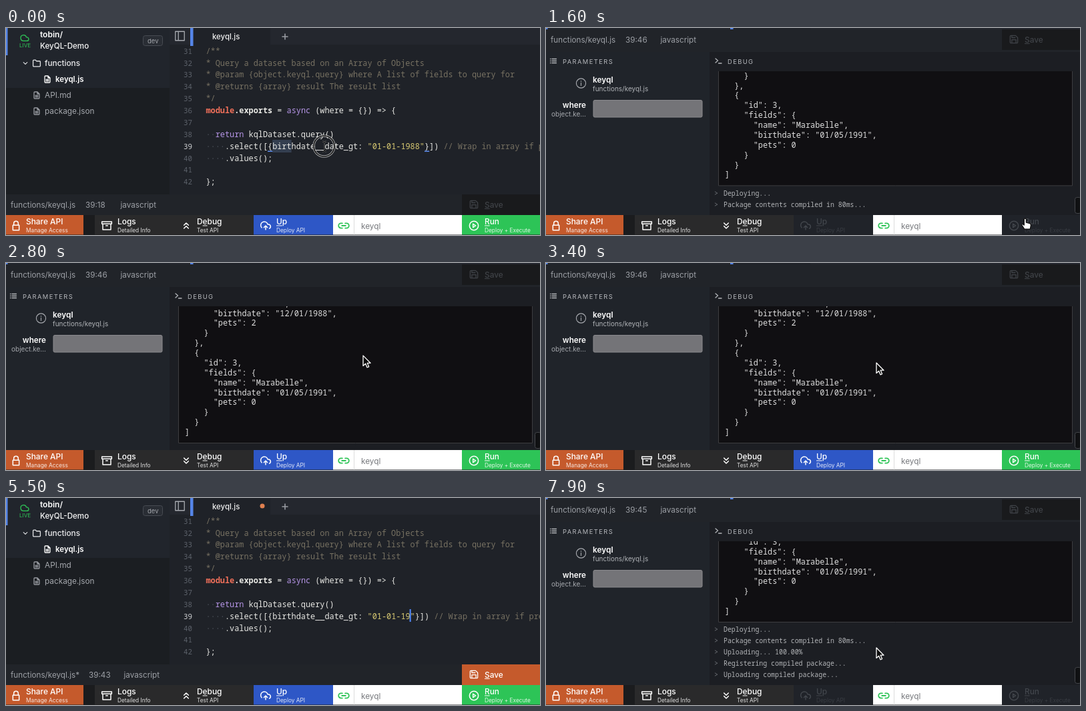
Write an HTML page with a canvas that moves like this. It is 800 px wide and 311 px high and loops after 8 s.

```html
<!DOCTYPE html>
<html lang="en">
<head>
<meta charset="utf-8">
<title>API editor</title>
<style>
  html, body { margin: 0; width: 100%; height: 100%; overflow: hidden; background: #1f2228; }
  canvas { display: block; width: 800px; height: 311px; }
</style>
</head>
<body>
<canvas id="stage"></canvas>
<script>
const canvas = document.getElementById('stage');
const ctx = canvas.getContext('2d');
const dpr = window.devicePixelRatio || 1;
canvas.width = 800 * dpr;
canvas.height = 311 * dpr;

const LOOP = 8000;
const RUNS = [1400, 7000];        // moments at which a deploy starts
const EDIT = 5400;                // first keystroke
const CLICKS = [1200, 4200, 5000, 6700];
const UI = 'Inter, "Open Sans", sans-serif';
const MONO = '"Noto Sans Mono", "DejaVu Sans Mono", monospace';
const COL = 7.12, CODE_X = 299.5, CODE_SIZE = COL / 0.6;
const ORANGE = '#c55a2c', PLAIN = '#e8e8e4', NOTE = '#777162', PURPLE = '#b796e8', RED = '#f0705a';

// Icons on a 24-unit grid
const CIRCLE = 'M2 12a10 10 0 1 0 20 0a10 10 0 1 0-20 0';
const ICON = {
  lock: 'M5 11h14v11H5zM7 11V7a5 5 0 0 1 10 0v4',
  archive: 'M21 8v13H3V8M1 3h22v5H1zM10 12h4',
  up: 'M17 11l-5-5-5 5M17 18l-5-5-5 5',
  down: 'M7 13l5 5 5-5M7 6l5 5 5-5',
  upload: 'M16 16l-4-4-4 4M12 12v9M20.4 18.4A5 5 0 0 0 18 9h-1.3A8 8 0 1 0 3 16.3',
  cloud: 'M18 10h-1.3A8 8 0 1 0 9 20h9a5 5 0 0 0 0-10z',
  link: 'M15 7h3a5 5 0 0 1 0 10h-3M9 17H6A5 5 0 0 1 6 7h3M8 12h8',
  play: CIRCLE + 'M10 8l6 4-6 4z',
  info: CIRCLE + 'M12 17v-6M12 7v1',
  save: 'M19 21H5a2 2 0 0 1-2-2V5a2 2 0 0 1 2-2h11l5 5v11a2 2 0 0 1-2 2zM17 21v-8H7v8M7 3v5h8',
  folder: 'M22 19a2 2 0 0 1-2 2H4a2 2 0 0 1-2-2V5a2 2 0 0 1 2-2h5l2 3h9a2 2 0 0 1 2 2z',
  file: 'M14 2H6a2 2 0 0 0-2 2v16a2 2 0 0 0 2 2h12a2 2 0 0 0 2-2V8zM14 2v6h6M16 13H8M16 17H8',
  list: 'M8 6h13M8 12h13M8 18h13M3 6h1M3 12h1M3 18h1',
  prompt: 'M3 17l7-6-7-6M12 19h9',
  chevron: 'M6 9l6 6 6-6',
  sidebar: 'M3 3h18v18H3zM9 3v18',
  plus: 'M12 4v16M4 12h16'
};
const ARROW = new Path2D('M0 0V15.5L3.6 12.2L6 17.8L8.6 16.7L6.2 11.2H11Z');
const HAND = new Path2D('M-1.5 1Q0-1 1.5 1V6L7 7.5Q9 8 8.5 11L7.5 16H-1L-5 10Q-5 8-3.5 8.5L-1.5 10Z');
const BEAM = new Path2D('M-3-7.5Q0-7.5 0-5.5Q0-7.5 3-7.5M0-5.5V5.5M-3 7.5Q0 7.5 0 5.5Q0 7.5 3 7.5');

const RESULT = [
  '      "name": "Tobin",', '      "birthdate": "12/01/1988",', '      "pets": 2', '    }', '  },', '  {',
  '    "id": 3,', '    "fields": {', '      "name": "Marabelle",', '      "birthdate": "01/05/1991",',
  '      "pets": 0', '    }', '  }', ']'
];
const LOG = [
  [100, 'Deploying...'], [200, 'Package contents compiled in 80ms...'], [250, 'Uploading... 100.00%'],
  [300, 'Registering compiled package...'], [400, 'Uploading compiled package...']
];

// time, x, y
const POINTER = [
  [0, 477, 178], [300, 630, 178], [500, 630, 178], [900, 730, 299], [1200, 736, 305], [1500, 736, 304],
  [2000, 561, 132], [2500, 561, 132], [3200, 495, 150], [3500, 495, 150], [4000, 300, 296],
  [4400, 300, 296], [4900, 618, 178], [6200, 618, 178], [6700, 736.5, 297], [7000, 736.5, 297],
  [7400, 560, 88], [7500, 560, 88], [7900, 495, 225]
];

const clamp = v => Math.max(0, Math.min(1, v));
const ease = v => { v = clamp(v); return v * v * (3 - 2 * v); };

function rect(x, y, w, h, color) {
  ctx.fillStyle = color;
  ctx.fillRect(x, y, w, h);
}

function text(s, x, y, size, color, { weight = 400, font = UI, spacing = 0, align = 'left' } = {}) {
  ctx.font = `${weight} ${size}px ${font}`;
  ctx.letterSpacing = spacing + 'px';
  ctx.textAlign = align;
  ctx.fillStyle = color;
  ctx.fillText(s, x, y);
}

const mono = (s, x, y, color, size = CODE_SIZE, weight = 400) =>
  text(s, x, y, size, color, { font: MONO, weight });

function icon(name, x, y, size, color, weight = 1.3) {
  const scale = size / 24;
  ctx.save();
  ctx.translate(x - size / 2, y - size / 2);
  ctx.scale(scale, scale);
  ctx.lineWidth = weight / scale;
  ctx.lineCap = ctx.lineJoin = 'round';
  ctx.strokeStyle = color;
  ctx.stroke(new Path2D(ICON[name]));
  ctx.restore();
}

// An underscore marks the shortcut letter that follows it.
function label(s, x, y, color) {
  const at = s.indexOf('_');
  text(s.replace('_', ''), x, y, 11.9, color, { weight: 500 });
  if (at < 0) return;
  const start = x + ctx.measureText(s.slice(0, at)).width;
  rect(start, y + 1.5, ctx.measureText(s[at + 1]).width, 1, color);
}

function clipped(x, y, w, h, paint) {
  ctx.save();
  ctx.beginPath();
  ctx.rect(x, y, w, h);
  ctx.clip();
  paint();
  ctx.restore();
}

function roundBox(x, y, w, h, r, fill, stroke) {
  ctx.beginPath();
  ctx.roundRect(x, y, w, h, r);
  ctx.fillStyle = fill;
  ctx.fill();
  ctx.strokeStyle = stroke;
  ctx.lineWidth = 1;
  ctx.stroke();
}

function stateAt(t) {
  const year = t < EDIT ? '1988' : t < 5500 ? '198' : t < 5700 ? '19' : t < 5900 ? '199' : '1990';
  const column = t < 5000 ? Math.round(18 + 28 * clamp(t / 300)) : 41 + year.length;
  const run = t >= RUNS[1] ? RUNS[1] : t >= RUNS[0] ? RUNS[0] : Infinity;
  const busy = t >= run && t < run + (run === RUNS[0] ? 600 : LOOP);
  const opened = ease((t - RUNS[0] + 50) / 200) - ease((t - 4200) / 300) + ease((t - RUNS[1] + 50) / 200);
  return {
    t, year, column, busy, opened, run,
    dirty: t >= EDIT && t < RUNS[1],
    panelY: 248 * (1 - opened)
  };
}

function sidebar(s) {
  rect(0, 0, 245, 281, '#1b1e22');
  rect(0, 0, 245, 90, '#21252c');
  rect(0, 0, 2.5, 41, '#5585e8');
  icon('cloud', 28, 15, 13, '#2fc457');
  text('LIVE', 20, 29, 8.1, '#2fc457');
  text('tobin/', 51, 13.5, 12, '#fff', { weight: 600 });
  text('KeyQL-Demo', 51, 31, 11.6, '#f6f6f6', { weight: 500 });
  roundBox(205.5, 11.5, 29, 15, 3, '#292d34', '#474b52');
  text('dev', 212, 22.5, 9.5, '#a3a6ab');
  const active = s.dirty && s.t >= 5600 ? '#e8703a' : '#fff';
  icon('chevron', 29, 53, 11, '#d5d7da');
  icon('folder', 46, 53, 13, '#e4e5e7');
  text('functions', 58, 57, 11.8, '#ececee', { weight: 500 });
  icon('file', 62, 77, 12, active);
  text('keyql.js', 74, 81, 11.5, active, { weight: 600 });
  ['API.md', 'package.json'].forEach((name, i) => {
    icon('file', 46, 101 + 24 * i, 12, '#989ba1');
    text(name, 58, 105 + 24 * i, 11.8, '#a5a8ad');
  });
}

// Each token: text, colour and an optional weight
function codeLines(s) {
  return [
    [['/**', NOTE]],
    [['* Query a dataset based on an Array of Objects', NOTE]],
    [['* @param {object.keyql.query} where A list of fields to query for', NOTE]],
    [['* @returns {array} result The result list', NOTE]],
    [['*/', NOTE]],
    [['module', RED, 600], ['.exports', PLAIN, 600], [' = ', PLAIN], ['async', PURPLE],
      [' (where = {}) => {', PLAIN]],
    [],
    [['··', '#4b4f57'], ['return', PURPLE], [' kqlDataset.query()', PLAIN]],
    [['····', '#4b4f57'], ['.select([{birthdate__date_gt: ', PLAIN], [`"01-01-${s.year}"`, '#dacb73'],
      ['}]) ', PLAIN], ['// Wrap in array if present', NOTE]],
    [['····', '#4b4f57'], ['.values();', PLAIN]],
    [],
    [['};', PLAIN]]
  ];
}

function editor(s) {
  rect(245, 0, 555, 281, '#1f2228');
  rect(245, 0, 555, 25, '#24272e');
  rect(281, 0, 115, 25, '#1f2228');
  rect(276, 0, 4.5, 27, '#5585e8');
  icon('sidebar', 260.5, 12, 18, '#a7aab0');
  text('keyql.js', 309, 17, 11.4, '#f0f0f0', { weight: 500 });
  icon('plus', 418, 13, 12, '#9a9da3', 1.6);
  if (s.dirty) {
    ctx.beginPath();
    ctx.arc(384, 12, 3.5, 0, 7);
    ctx.fillStyle = '#e08050';
    ctx.fill();
  }
  const xAt = col => CODE_X + col * COL;
  if (s.t < 500) rect(xAt(14), 168, (s.column - 14) * COL, 19, '#343f50');
  codeLines(s).forEach((tokens, i) => {
    const y = 38.7 + 17.87 * i;
    text(31 + i, 279, y, 10.8, i === 8 ? '#d0d2d5' : '#5d626b', { font: MONO, align: 'right' });
    let col = 0;
    for (const [word, color, weight = 500] of tokens) {
      mono(word, xAt(col), y, color, CODE_SIZE, weight);
      col += word.length;
    }
  });
  if (s.t < EDIT) {
    rect(xAt(13), 184.5, COL, 1.5, '#5f90f5');
    rect(xAt(46), 184.5, COL, 1.5, '#5f90f5');
  }
  if (s.t >= 5000 && s.t < 6300) rect(xAt(s.column) - 1, 167, 2, 19, '#528bff');
}

function output(s) {
  const log = s.busy ? LOG.filter(([delay]) => s.t >= s.run + delay) : [];
  const shift = 16.8 * log.length;
  roundBox(258.5, -20, 530, 290.5 - shift, 0, '#100f12', '#3d3d40');
  RESULT.forEach((line, i) =>
    mono(line, 268, 258 - 14.87 * (RESULT.length - 1 - i) - shift, '#dedede'));
  log.forEach(([, line], i) => {
    const y = 268.5 - 16.8 * (log.length - 1 - i);
    mono('>', 252, y, '#74777c', 9.9);
    mono(line, 266, y, '#b2b4b7', 9.9);
  });
}

function panel(s) {
  ctx.translate(0, s.panelY);
  rect(0, 2, 800, 279, '#212429');
  rect(0, 36, 245, 245, '#20242a');
  rect(245, 36, 555, 245, '#1c1e23');
  const name = 'functions/keyql.js' + (s.dirty ? '*' : '');
  const offset = s.dirty ? 5 : 0;
  text(name, 7, 21.5, 11.7, '#9da0a6');
  text('39:' + s.column, 119 + offset, 21.5, 11.7, '#9da0a6');
  text('javascript', 171.5 + offset, 21.5, 11.7, '#9da0a6');
  rect(683, 2, 117, 31, s.dirty ? ORANGE : '#191a1c');
  const saveColor = s.dirty ? '#fff' : '#3f4247';
  icon('save', 701, 17, 15, saveColor);
  label('_Save', 717, 21.5, saveColor);

  const heading = { spacing: 1.4 };
  icon('list', 11, 49.5, 12, '#b5b7bb');
  text('PARAMETERS', 25, 53.5, 9.4, '#b5b7bb', heading);
  icon('prompt', 258.5, 49.5, 12, '#b5b7bb');
  text('DEBUG', 272, 53.5, 9.4, '#b5b7bb', heading);

  icon('info', 52.5, 83, 17, '#a9acb1', 1.1);
  text('keyql', 70, 82, 11.9, '#fff', { weight: 600 });
  text('functions/keyql.js', 70, 95, 10, '#b0b3b7');
  text('where', 60, 120, 11.7, '#fff', { weight: 600, align: 'right' });
  text('object.ke…', 60, 132.5, 10, '#a5a8ad', { align: 'right' });
  roundBox(71, 108.5, 163, 25.5, 2, '#747478', '#8a8a8d');

  clipped(245, 65, 555, 216, () => output(s));
  roundBox(792.5, 254.5, 9, 24, 3, '#101113', '#46484c');
}

function button(x, w, color, glyph, title, sub, muted) {
  const ink = muted ? '#42464c' : '#fff';
  rect(x, 281, w, 29.5, muted ? '#202329' : color);
  icon(glyph, x + (x ? 18 : 15), 297, 16, ink, 1.5);
  const left = x + (x ? 34 : 30);
  label(title, left, 295, ink);
  text(sub, left, 306.5, 8.3, muted ? '#393d43' : 'rgba(255,255,255,.86)');
}

function toolbar(s, pointer) {
  rect(0, 281, 800, 30, '#1b1c1e');
  const hover = pointer.x > 683 && pointer.y > 281;
  button(0, 116, ORANGE, 'lock', 'Share API', 'Manage Access');
  button(133, 119, '#2a2a2b', 'archive', 'Logs', 'Detailed Info');
  button(252, 119, '#2a2a2b', s.opened > 0.5 ? 'down' : 'up', 'D_ebug', 'Test API');
  button(371, 119, '#2e57c6', 'upload', '_Up', 'Deploy API', s.busy);
  rect(490, 281, 193, 29.5, '#fff');
  rect(521, 281, 1, 29.5, '#dcdcdc');
  icon('link', 506, 297, 17, '#2fc457', 1.8);
  text('keyql', 532, 302, 11.8, '#77797d');
  button(683, 117, hover ? '#1ce04f' : '#2dc457', 'play', '_Run', 'Deploy + Execute', s.busy);
}

function pointerAt(t) {
  const next = POINTER.findIndex(p => p[0] > t);
  if (next < 0) return { x: 495, y: 225 };
  const [t0, x0, y0] = POINTER[next - 1], [t1, x1, y1] = POINTER[next];
  const k = ease((t - t0) / (t1 - t0));
  return { x: x0 + (x1 - x0) * k, y: y0 + (y1 - y0) * k };
}

function ring(x, y, radius, glow) {
  for (const [width, color] of [[3.4, `rgba(255,255,255,${glow})`], [1.6, '#111']]) {
    ctx.beginPath();
    ctx.arc(x, y, radius, 0, 7);
    ctx.lineWidth = width;
    ctx.strokeStyle = color;
    ctx.stroke();
  }
}

function drawPointer(s, { x, y }) {
  if (s.t >= EDIT && s.t < 6300) return;
  const release = [300, ...CLICKS].find(c => s.t > c && s.t <= c + 200);
  if (s.t <= 300) ring(x - 0.5, y - 0.5, 15.5, 0.6);
  else if (release) ring(x, y, 15.5 + (s.t - release) / 15, 0.2);

  ctx.save();
  ctx.translate(x, y);
  ctx.lineJoin = 'round';
  if (y < 281 && x > 245 && s.opened < 0.5) {
    ctx.lineWidth = 2;
    ctx.strokeStyle = '#77797c';
    ctx.stroke(BEAM);
    ctx.lineWidth = 1.1;
    ctx.strokeStyle = '#111';
    ctx.stroke(BEAM);
  } else {
    const hand = y >= 281;
    const shape = hand ? HAND : ARROW;
    ctx.fillStyle = hand ? '#fff' : '#0b0b0b';
    ctx.strokeStyle = hand ? '#111' : '#fff';
    ctx.lineWidth = 1.3;
    ctx.fill(shape);
    ctx.stroke(shape);
  }
  ctx.restore();
}

function draw(now) {
  const t = Math.floor(now % LOOP / 100) * 100;
  const s = stateAt(t);
  const pointer = pointerAt(t);
  ctx.setTransform(dpr, 0, 0, dpr, 0, 0);
  sidebar(s);
  editor(s);
  clipped(0, 0, 800, 281, () => panel(s));
  toolbar(s, pointer);
  drawPointer(s, pointer);
}

const started = performance.now();
function tick() {
  draw(performance.now() - started);
  requestAnimationFrame(tick);
}
tick();
</script>
</body>
</html>
```
